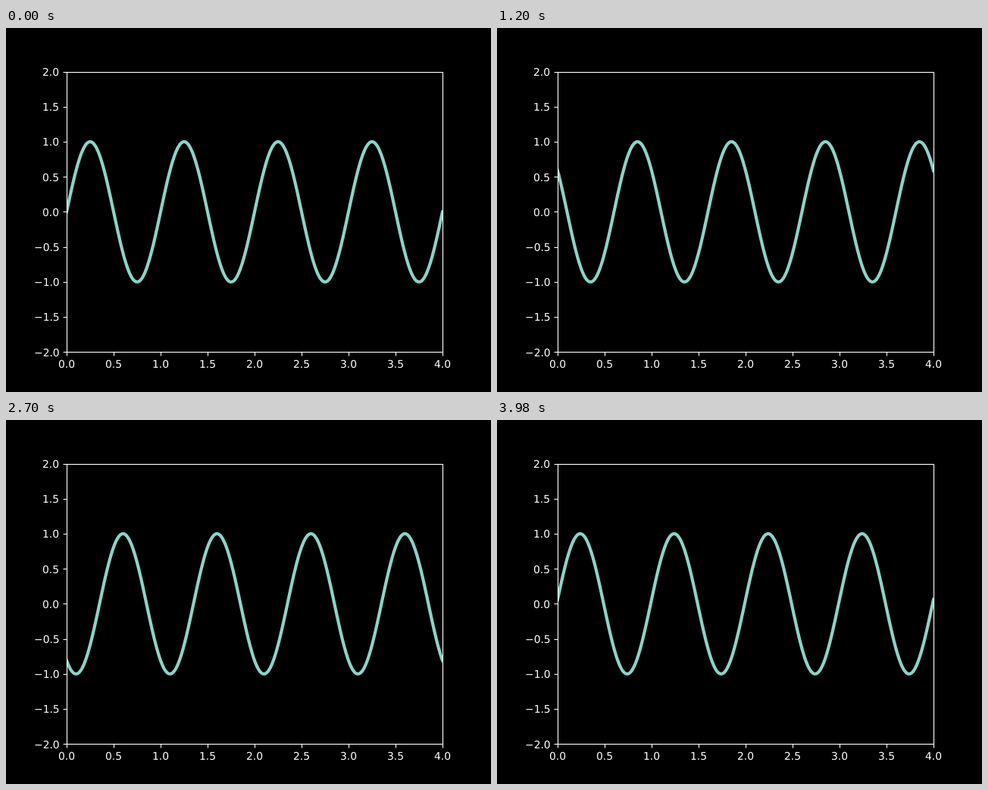
Animation, 640 px wide and 480 px high, one loop 4000 ms. Source, as an HTML page with a canvas:

```html
<!DOCTYPE html>
<html lang="en">
<head>
<meta charset="utf-8">
<title>Travelling sine wave</title>
<style>
  html, body { margin: 0; width: 100%; height: 100%; overflow: hidden; background: #000; }
  canvas { display: block; width: 640px; height: 480px; }
</style>
</head>
<body>
<canvas id="plot" width="640" height="480"></canvas>
<script>
const ctx = document.getElementById('plot').getContext('2d');
const LEFT = 80, RIGHT = 576, TOP = 57.6, BOTTOM = 427.2;
const PT = 100 / 72;
const STEP = 20, STEPS = 200, SAMPLES = 1000;

const toX = v => LEFT + (RIGHT - LEFT) * v / 4;
const toY = v => BOTTOM - (BOTTOM - TOP) * (v + 2) / 4;
const snap = p => Math.floor(p + 0.5) + 0.5;

function segment(x1, y1, x2, y2) {
  ctx.beginPath();
  ctx.moveTo(x1, y1);
  ctx.lineTo(x2, y2);
  ctx.stroke();
}

function drawWave(shift) {
  ctx.save();
  ctx.beginPath();
  ctx.rect(LEFT, 58, RIGHT - LEFT + 1, 370);
  ctx.clip();
  ctx.beginPath();
  for (let i = 0; i < SAMPLES; i++) {
    const x = 4 * i / (SAMPLES - 1);
    ctx.lineTo(toX(x), toY(Math.sin(2 * Math.PI * (x - shift))));
  }
  ctx.strokeStyle = '#8dd3c7';
  ctx.lineWidth = 3 * PT;
  ctx.lineJoin = 'round';
  ctx.lineCap = 'square';
  ctx.stroke();
  ctx.restore();
}

function drawAxes() {
  ctx.strokeStyle = ctx.fillStyle = '#fff';
  ctx.lineWidth = 0.8 * PT;
  ctx.lineCap = 'butt';
  ctx.font = 10 * PT + 'px "DejaVu Sans", sans-serif';
  ctx.textRendering = 'geometricPrecision';
  ctx.textAlign = 'left';
  ctx.textBaseline = 'alphabetic';

  const l = snap(LEFT), r = snap(RIGHT), t = snap(TOP), b = snap(BOTTOM);
  for (let i = 0; i <= 8; i++) {
    const v = i / 2;
    const x = snap(toX(v));
    segment(x, b, x, b + 5);
    const xText = v.toFixed(1);
    ctx.fillText(xText, Math.round(toX(v) - ctx.measureText(xText).width / 2), 448);

    const w = v - 2, y = snap(toY(w));
    segment(l - 5, y, l, y);
    const yText = (w < 0 ? '\u2212' : '') + Math.abs(w).toFixed(1);
    const textX = LEFT - 7 * PT - ctx.measureText(yText).width;
    ctx.fillText(yText, Math.round(textX), Math.round(toY(w) + 5.3));
  }
  ctx.strokeRect(l, t, r - l, b - t);
}

function draw(now) {
  const step = Math.floor(now / STEP + 0.001) % STEPS;
  ctx.fillStyle = '#000';
  ctx.fillRect(0, 0, 640, 480);
  drawWave(step / 100);
  drawAxes();
}

function tick(now) {
  draw(now);
  requestAnimationFrame(tick);
}

draw(0);
requestAnimationFrame(tick);
</script>
</body>
</html>
```
